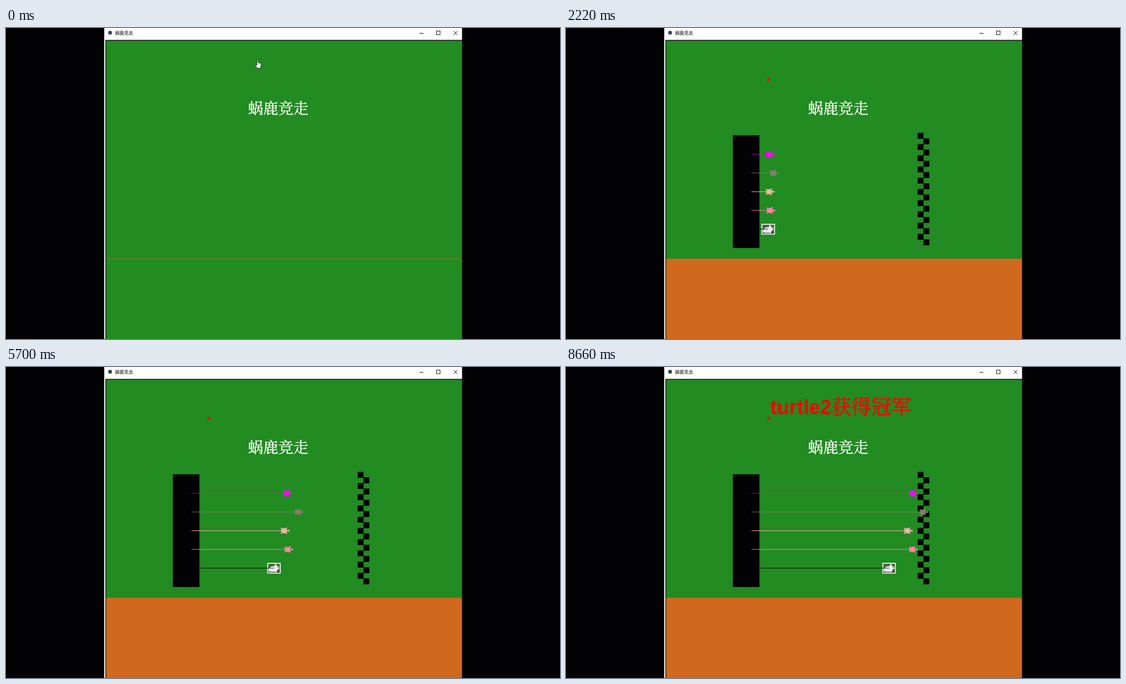
Write an HTML page that moves like this. It is 998 px wide and 561 px high and loops after 8.77 s.

```html
<!DOCTYPE html>
<html lang="zh">
<head>
<meta charset="utf-8">
<title>蜗鹿竞走</title>
<style>
  html, body { margin: 0; width: 100%; height: 100%; overflow: hidden; background: #000; }
  svg { display: block; width: 998px; height: 561px; }
  .cjk { font-family: "Noto Serif CJK SC", "Noto Sans CJK SC", "Noto Sans CJK", serif; }
  .bar { font: 8.25px "Noto Sans CJK SC", "Noto Sans CJK", sans-serif; fill: #111; }
  .title { font-size: 27.2px; fill: #fff; stroke: #fff; stroke-width: .4; }
  .win { font: bold 36px "Liberation Sans", Arial, sans-serif; fill: #f00; }
  .win .cjk { font-weight: 400; stroke: #f00; stroke-width: .8; }
</style>
</head>
<body>
<svg viewBox="0 0 998 561">
  <rect width="998" height="561" fill="#020204"/>
  <rect x="177" width="645" height="561" fill="#fff"/>
  <circle cx="187.5" cy="8.5" r="3.5" fill="#354653"/>
  <text class="bar" x="196.2" y="12">蜗鹿竞走</text>
  <g stroke="#111" fill="none">
    <path d="M745 9.5h7"/>
    <rect x="775.5" y="5.5" width="6.5" height="6.5"/>
    <path d="M806.3 5.5l7 7m0-7l-7 7"/>
  </g>
  <rect x="179" y="21.5" width="643" height="540" fill="#101510"/>
  <rect x="180.5" y="23" width="642" height="538" fill="#228b22"/>

  <rect id="edge" x="180.5" y="416.15" width="642" height=".7" fill="#d2691e"/>
  <rect id="soil" x="180.5" y="416.15" width="642" height="145" fill="#d0691e"/>
  <rect id="frame" x="300.8" y="193.8" width="47.4" height="202.8" fill="none" stroke="#030305" stroke-width=".7"/>
  <rect id="block" x="300.5" y="193.5" width="48" height="203.4" fill="#030305"/>
  <g id="checks" fill="#030305"></g>
  <rect x="821.5" width="177" height="561" fill="#020204"/>
  <text class="cjk title" x="436" y="154.8">蜗鹿竞走</text>
  <g id="racers"></g>
  <path id="arrow" d="M0 0l-6.1-3.4 1.4 3.4-1.4 3.4z" fill="#f00" stroke="#f00" stroke-width=".6"/>
  <text id="win" class="win" x="368" y="84.8">turtle2<tspan class="cjk">获得冠军</tspan></text>
  <path id="hand" d="M452 58.2q1.4-1.4 2.2.4v4l4 .9q1.6.4 1.5 2.2l-.5 4-1.2 3h-5.4l-3.8-5.6q.2-1.8 1.8-.8l1.4 1.3z"
    fill="#fff" stroke="#111" stroke-width=".9"/>
</svg>
<script>
const LOOP = 8770, STEP = 890 / 23, WIN = 8660;
const START = 334, SCALE = .675, LANE = 50 * SCALE;
const ORIGIN = [503, 295.5], CORNER = [368.5, 93];
const $ = id => document.getElementById(id);

function add(parent, tag, attrs) {
  const el = document.createElementNS("http://www.w3.org/2000/svg", tag);
  for (const k in attrs) el.setAttribute(k, attrs[k]);
  return parent.appendChild(el);
}
const show = (el, on) => el.setAttribute("visibility", on ? "visible" : "hidden");
const mix = (a, b, k) => a + (b - a) * k;

// One side of the turtle, nose to tail, then the same mirrored.
const side = "16,0 14,2 10,1 7,4 9,7 8,9 5,6 1,7 -3,5 -6,8 -8,6 -5,4 -7,0";

function turtle(parent, color) {
  for (const flip of [1, -1]) add(parent, "polygon", {
    points: side, fill: color, stroke: color, transform: `scale(${SCALE} ${SCALE * flip})`
  });
}

function rabbit(parent) {
  add(parent, "rect", { x: -11.3, y: -8.8, width: 22.6, height: 17.6, fill: "#47663a", stroke: "#fff", "stroke-width": 1.6 });
  const shape = (d, fill) => add(parent, "path", { d, fill });
  shape("M-10.4 5h20.8v3h-20.8z", "#334d29");
  shape("M-9.5 6q-1-7 4-8.5 4-1.5 6.5-1l1-4.5 2 1 1.5 3q3.5 1 4 4-1.5 2.5-3.5 2.5l-1 4.5z", "#eceef2");
  shape("M-8 4q3 2 8 1l4 2h-12z", "#b8bfca");
  add(parent, "circle", { cx: 6.6, cy: -1.2, r: .7, fill: "#333" });
}

// Every runner passes through its marks at the shared times.
const times = [1340, 3620, 6960, WIN];
const lanes = [
  { color: "#ff00ff", alpha: .6, marks: [417, 558, 623] },
  { color: "#8b7d6b", alpha: .8, marks: [435, 581, 642] },
  { color: "#f0b4a8", alpha: 1, marks: [416, 552, 614] },
  { color: "#ff82ab", alpha: .9, marks: [420, 560, 623] },
  { color: "#000", alpha: .9, marks: [414, 525, 582], hare: true }
];

lanes.forEach((lane, i) => {
  lane.y = 227.9 + i * LANE;
  lane.body = add($("racers"), "g", {});
  lane.hare ? rabbit(lane.body) : turtle(lane.body, lane.color);
  lane.line = add($("racers"), "rect", { x: START, y: lane.y - .6, height: 1, fill: lane.color, opacity: lane.alpha });
  if (!lane.hare) lane.body.before(lane.line);
});

const checks = Array.from({ length: 20 }, (_, i) => {
  const column = i < 10 ? 0 : 1;
  return add($("checks"), "rect", {
    x: 633.5 + column * 10.4, y: 189 + (i % 10) * 20.25 + column * 10.1, width: 10.6, height: 10.7
  });
});

function place(marks, t) {
  if (t <= times[0]) return START;
  const i = Math.max(1, times.findIndex(v => v >= t));
  const from = i > 1 ? marks[i - 2] : START;
  return mix(from, marks[i - 1], (t - times[i - 1]) / (times[i] - times[i - 1]));
}

function draw(t) {
  const held = t >= WIN ? WIN : Math.floor(t / STEP + .3) * STEP;
  show($("edge"), t < 110);
  show($("soil"), t >= 110);
  show($("frame"), t >= 150 && t < 270);
  show($("block"), t >= 270);
  show($("hand"), t < 250);
  show($("win"), t >= WIN);
  checks.forEach((c, i) => show(c, held >= 300 + i * 20));

  lanes.forEach((lane, i) => {
    const x = place(lane.marks, Math.min(held, WIN)), on = t >= 720 + i * 40;
    show(lane.body, on);
    show(lane.line, on);
    lane.body.setAttribute("transform", `translate(${x} ${lane.y})`);
    lane.line.setAttribute("width", x - START);
  });

  const k = Math.min(1, Math.max(0, (held - 920) / 400));
  const at = ORIGIN.map((v, i) => mix(v, CORNER[i], k));
  show($("arrow"), t >= 880);
  $("arrow").setAttribute("transform", `translate(${at})`);
}

const begin = performance.now();
function tick() {
  draw((performance.now() - begin) % LOOP);
  requestAnimationFrame(tick);
}
tick();
</script>
</body>
</html>
```
